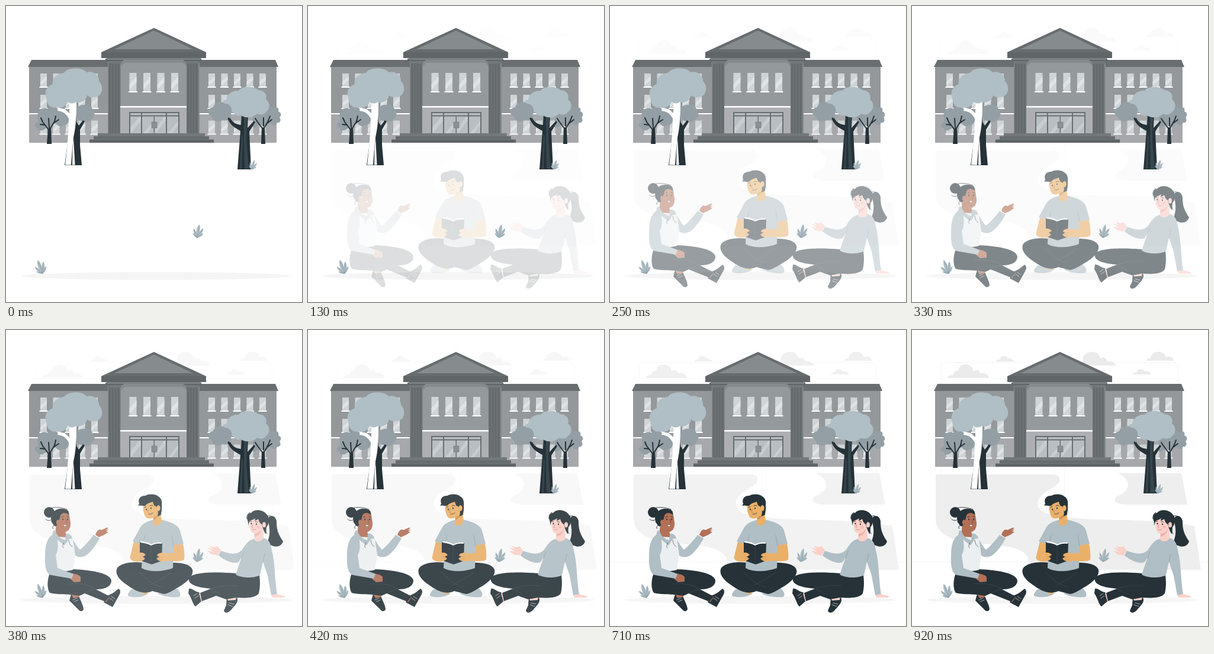
Animation of 500x500 px, one loop 1 s. Source, as an HTML page:

```html
<!DOCTYPE html>
<html lang="en">
<head>
<meta charset="utf-8">
<title>Campus lawn</title>
<style>
html, body { margin: 0; width: 100%; height: 100%; overflow: hidden; background: #fff; }
svg { display: block; width: 100vw; height: 100vh; }
.line { fill: none; stroke: #263238; stroke-linecap: round; stroke-linejoin: round; }
.dark { fill: #263238; }
.pale { fill: #b0bec5; }
.tan { fill: #eab069; }
.brown { fill: #b27057; }
.pink { fill: #fbd0c8; }
</style>
</head>
<body>
<svg viewBox="0 0 500 500" xmlns="http://www.w3.org/2000/svg">
<defs>
  <g id="plant">
    <path fill="#b0bec5" d="M0 0C-6-5-8-11-7-15C-3-12 0-6 0 0C-4-9-2-19 2-23C5-17 4-7 0 0C2-9 5-15 9-17C10-11 6-4 0 0C4-6 7-8 10-8C9-4 5-1 0 0C-4-1-7-4-8-7C-4-7-1-3 0 0Z"/>
    <path fill="none" stroke="#78909c" stroke-width=".5" d="M0 0Q-4-7-6-13M0 0Q1-10 2-20M0 0Q4-9 8-15M0 0L8-7M0 0L-7-6"/>
  </g>
</defs>

<g id="backdrop" opacity="0">
  <g fill="none" stroke="#f0f0f0" stroke-width=".8">
    <rect x="49" y="55" width="192" height="282" rx="6"/>
    <rect x="257.500" y="55" width="192" height="282" rx="6"/>
    <path d="M0 391.500H500"/>
  </g>
  <g fill="#ebebeb">
    <path d="M60 81C61 76 67 76 70 76C71 68 76 69 78 69C79 60 88 56 95 59C101 61 104 66 104 70C109 66 114 68 115 73C121 71 129 74 130 81Z"/>
    <path d="M142 53C143 50 147 50 149 49C150 43 159 42 162 48C166 46 168 48 168 50C171 50 172 51 172 53Z"/>
    <path d="M281 60C282 54 286 54 289 53C287 43 295 37 303 37C311 36 317 41 318 48C323 45 329 48 330 53C337 52 344 55 344 60Z"/>
    <path d="M396 52C397 47 400 48 403 48C403 41 410 36 418 37C425 38 428 42 429 46C435 43 442 46 442 52Z"/>
    <path d="M373 75C374 72 378 72 380 71C381 65 390 64 393 70C398 69 403 71 404 75Z"/>
  </g>
  <g fill="#eee">
    <path d="M40 244H238C247 244 251 249 249 255C245 266 224 271 216 283C206 299 218 308 238 313C292 325 400 316 477 331L488 405H200C193 396 201 393 195 383C181 360 126 364 91 358C59 353 40 339 40 320Z"/>
    <path d="M348 242H455L465 295H360C343 294 337 286 348 280C366 273 375 255 348 242Z"/>
  </g>
</g>

<ellipse cx="254" cy="456" rx="230" ry="6.500" fill="#f5f5f5"/>

<g id="building">
  <path fill="#94989b" d="M39 102H457V231H39Z"/>
  <path fill="#a6a8ab" d="M39 183H457V231H39Z"/>
  <path fill="#fff" d="M39 181H175V183H39ZM323 181H457V183H323Z"/>
  <path fill="#696e71" d="M43 91H455L460 103H37Z"/>
  <path fill="#858a8d" d="M172 88H327V220H172Z"/>
  <path fill="#94999c" d="M194 102L200 96H299L305 102V216H194Z"/>
  <path fill="#adafb2" d="M192 171H306V216H192Z"/>
  <path fill="#fff" d="M190 169H308V171.500H190Z"/>
  <g id="panes"></g>
  <g id="door">
    <path fill="#686e71" d="M208 179H293V216H208Z"/>
    <path fill="#b8bec1" d="M210 181H228V184.500H210ZM230 181H270V184.500H230ZM272 181H291V184.500H272ZM210 186.500H228V215H210ZM230 186.500H249.500V215H230ZM251 186.500H270V215H251ZM272 186.500H291V215H272Z"/>
    <path fill="#c8cdcf" d="M210 205L225 187H228V194L211 215H210ZM232 215L249 194V202L239 215ZM253 207L267 187H270V193L253 215ZM274 215L291 194V201L280 215Z"/>
    <path fill="#8a9194" stroke="#686e71" stroke-width=".6" d="M246 196H255V206H246Z"/>
  </g>
  <g id="columns"></g>
  <path fill="#606568" d="M161 78H338V88H161Z"/>
  <path fill="#7b8083" d="M170 88H329V91H170Z"/>
  <path fill="#676c6f" d="M161 78L250 37L338 78Z"/>
  <path fill="#868b8e" d="M183 73L250 41.500L316 73Z"/>
  <path fill="#73787b" d="M155 215H336V220H155Z"/>
  <path fill="#676c6f" d="M148 220H343V225.500H148Z"/>
  <path fill="#5f6467" d="M141 225.500H351V231H141Z"/>
</g>

<g id="trees">
  <g fill="#949fa5">
    <path d="M54 188C51 176 62 169 71 174C78 167 86 171 89 175C98 171 108 178 106 187C108 195 103 203 96 201C91 206 86 201 84 198L65 208C60 213 53 210 54 206C47 206 47 197 54 196Z"/>
    <path d="M119 183C116 174 122 166 132 167C141 165 146 171 146 175C152 179 149 188 145 190C143 197 132 196 127 194C121 194 118 188 119 183Z"/>
    <path d="M417 182C420 174 432 172 441 175C447 170 451 168 452 173C458 169 462 173 460 178C466 180 465 186 462 188C466 194 462 198 458 197C455 204 449 201 446 197C440 205 432 204 428 199C421 210 412 205 417 198Z"/>
  </g>
  <g class="line" stroke-width="2">
    <path d="M72 209L62 196L59 189M66 201L58 200M74 208L82 195L84 186M80 198L89 192M73 206L72 190"/>
    <path d="M434 208L425 196L421 190M435 208L443 194L446 186M441 198L449 192M435 203V189"/>
  </g>
  <path class="dark" d="M71 207H76L77 233H69ZM432 205H437L438 233H431Z"/>

  <path class="dark" d="M117 160L119 196L123 202L130 193L133 195L125 209L125 235L128 269H99L105 225L107 187L117 182Z"/>
  <path fill="#fff" d="M107 160H119C119 190 118 204 114 222L112 240L110 268.500H100C105 225 106 205 106 190C101 181 96 178 87 177L88 172L99 174L107 181Z"/>
  <path fill="#fff" d="M114 222L116.500 268.500H112L112.500 238Z"/>
  <path class="pale" d="M68 154C64 144 70 135 79 132C77 122 88 113 98 113C103 104 128 102 136 112C147 109 158 117 157 127C165 134 164 151 153 153C146 156 139 153 137 151C135 160 126 165 118 162C113 166 106 165 104 161C102 170 93 174 86 171C75 174 68 166 68 154Z"/>

  <path class="dark" d="M398 182H409L408 206L419 194L421 196L411 212L414 276H391L396 211C388 206 379 203 375 190L379 189C382 198 391 200 397 201Z"/>
  <path fill="#37474f" d="M402 186L407 187L406 228L410 275H403L402 228ZM398 215L400 222L398 275H395Z"/>
  <path class="pale" d="M363 177C361 168 364 160 372 158C374 147 384 142 393 143C398 135 418 134 426 142C437 142 442 151 439 158C447 163 446 175 439 179C436 185 427 184 424 182C418 189 404 190 397 185C390 187 385 182 383 179C377 184 366 184 363 177Z"/>
  <path fill="#949fa5" d="M343 183C339 177 345 171 350 171C352 162 364 160 370 165C380 165 384 176 380 182C382 190 374 195 367 192C359 198 348 194 349 188Z"/>
  <path class="line" stroke-width="3" d="M376 190Q380 201 397 204"/>
  <use href="#plant" transform="translate(415 276) scale(.72) rotate(12)"/>
</g>

<use href="#plant" transform="translate(322.500 391.500) rotate(6)"/>
<use href="#plant" transform="translate(62 452) scale(1.070) rotate(-25)"/>

<g id="people" opacity="0">
  <g id="reader">
    <path class="pale" d="M224 438L212 438C208 442 203 448 208 450C221 453 235 450 241 445ZM276 438L289 437C294 441 297 449 292 451C279 452 264 450 256 445Z"/>
    <path class="tan" d="M228 438L240 441L236 447L229 444Z"/>
    <path class="dark" d="M233 393C210 390 190 395 187 404C183 418 203 430 214 437C226 444 237 446 247 441L267 446C274 445 280 441 287 437C300 430 318 417 315 405C312 395 292 391 266 394Z"/>
    <path class="line" style="stroke:#43535b" stroke-width=".5" d="M225 409C237 419 245 431 263 434M279 410Q260 423 244 431"/>
    <path class="tan" d="M216 357L232 362L228 376L238 379C239 386 235 391 226 391C214 392 208 388 210 382ZM282 363L299 361C301 371 302 380 301 388C296 392 270 391 261 390L266 377L281 378Z"/>
    <path class="pale" d="M247 321C237 324 231 327 227 333L214 357L231 363L229 402C242 410 267 408 282 402L283 364L300 361L294 339C291 329 280 325 265 321Z"/>
    <path class="tan" d="M264 377L284 377V390L262 390Z"/>
    <path class="line" style="stroke:#8195a0" stroke-width=".6" d="M231 362L235 347M283 364L280 347"/>
    <path class="tan" d="M249 308L260 303L263 322C261 332 249 333 248 326Z"/>
    <path fill="#cf954f" d="M249 316Q255 314 259 308Q258 317 249 321Z"/>
    <path class="dark" d="M226 358C234 358 240 360 245 363C251 360 257 359 264 360L263 390L246 396L226 389Z"/>
    <path fill="#fff" d="M227 357C235 357 241 359 245 362C251 359 257 358 263 359V361C256 360 251 361 245 364C239 361 234 360 227 359Z"/>
    <path class="line" style="stroke:#43535b" stroke-width=".5" d="M245 365V395"/>
    <path class="tan" d="M222 378C228 374 234 377 236 380L231 383L235 386C232 390 226 392 220 390ZM269 377C262 375 255 378 255 381L259 383L254 386C257 390 264 393 270 390Z"/>
    <path class="line" style="stroke:#c78c48" stroke-width=".6" d="M228 382H233M227 386H233M257 383H264M257 387H264"/>
    <path class="tan" d="M233 291C230 299 232 312 237 317C244 321 252 316 255 310L260 299L257 286Z"/>
    <path class="dark" d="M234 297C228 297 226 296 223 297C224 295 225 294 225 293C222 285 228 279 235 280C241 276 254 277 257 281C263 284 264 291 263 297C264 303 262 308 262 312L256 315C258 307 256 303 254 298C250 298 249 294 248 290C242 292 238 293 235 297Z"/>
    <ellipse class="tan" cx="257.500" cy="301" rx="3.200" ry="5"/>
    <path class="dark" d="M236 303a1 1.600 0 1 0 2 0a1 1.600 0 1 0-2 0M244 301a1 1.600 0 1 0 2 0a1 1.600 0 1 0-2 0"/>
    <path class="line" stroke-width=".9" d="M234 299.500L237 298.500M243 297Q246 295 248 297"/>
    <path class="line" style="stroke:#a86b35" stroke-width=".7" d="M240 303L239 307L241 308"/>
    <path class="line" stroke-width=".8" d="M241 311Q245 312 248 309"/>
  </g>

  <g id="talker">
    <path class="dark" d="M110 446L123 449C125 456 131 465 131 472C129 476 125 476 122 472L107 457ZM165 460L173 448C180 446 186 440 190 437C194 439 194 444 190 450L180 468Z"/>
    <path class="brown" d="M110 446L123 447L124 451L114 453ZM165 455L172 447L175 451L169 460Z"/>
    <path class="dark" d="M77 405C70 416 68 435 74 444C85 447 98 446 109 447L124 449L133 445L168 459L175 450L152 438C170 438 178 432 178 423C176 411 146 405 108 404Z"/>
    <path class="line" style="stroke:#43535b" stroke-width=".5" d="M105 429Q134 426 151 437L131 445"/>
    <path class="line" style="stroke:#fff" stroke-width=".6" d="M113 456L120 453M115 459L122 456M175 453L181 457M178 450L184 454"/>
    <path class="pale" d="M110 350C116 357 120 367 125 371C133 365 142 354 148 346L158 352C152 363 144 375 135 381C126 386 118 383 114 378Z"/>
    <path class="brown" d="M151 346C153 340 157 335 161 338L170 334C175 333 171 337 168 338L174 337L169 340L173 341L166 346L157 350ZM109 411C118 412 124 414 126 417V425L115 426L107 419Z"/>
    <path fill="#eceff1" d="M81 346C95 344 108 347 113 352L117 380L113 405C102 409 87 407 79 402Z"/>
    <path class="pale" d="M82 344C70 349 66 362 66 380C65 400 68 412 76 414L111 420L114 412L87 402L84 380C90 372 88 350 82 344Z"/>
    <path class="brown" d="M85 325L100 339L102 350L83 349Z"/>
    <path class="pale" d="M81 338C76 345 79 350 84 352L99 364L106 353L112 352C111 346 105 343 101 344L100 355C91 353 85 345 84 340Z"/>
    <path class="line" stroke-width=".6" d="M98 359Q94 365 97 368M106 355Q107 364 112 366"/>
    <circle class="dark" cx="73" cy="308" r="9"/>
    <path class="brown" d="M88 309C96 302 106 306 107 313L109 325C110 336 104 342 97 341C90 341 84 334 84 326Z"/>
    <path class="dark" d="M76 318C76 304 92 298 103 304Q107 307 106 312C99 307 95 309 92 313L90 321L86 330C82 335 80 327 77 325Z"/>
    <path class="line" stroke-width=".9" d="M75 301C83 298 95 300 103 303M67 320C75 325 78 319 82 315M82 328Q76 336 80 335M103 304Q106 306 106 311"/>
    <ellipse class="brown" cx="88" cy="325" rx="3" ry="4.500"/>
    <path class="dark" d="M95 320a1 1.600 0 1 0 2 0a1 1.600 0 1 0-2 0M103 320a1 1.600 0 1 0 2 0a1 1.600 0 1 0-2 0"/>
    <path class="line" stroke-width=".9" d="M94 316L97 315M103 315L106 316"/>
    <path class="line" style="stroke:#7d4233" stroke-width=".7" d="M101 320L103 325L101 326"/>
    <path fill="#fff" stroke="#5d3028" stroke-width=".5" d="M96 328Q100 330 103 329Q101 333 99 332Z"/>
  </g>

  <g id="listener">
    <path class="dark" d="M309 437C313 435 319 442 326 443L334 455L320 467C316 465 314 453 308 445ZM373 450L390 452C394 459 386 466 379 474C374 479 369 478 368 474L372 465Z"/>
    <path class="pink" d="M326 445L334 442L336 454L330 459ZM372 450L389 450L388 456L375 457Z"/>
    <path class="dark" d="M388 411C351 408 315 409 309 419C306 430 324 435 346 437L328 444L331 458L355 449L372 455L388 452C405 453 421 453 427 445C430 432 429 422 428 414Z"/>
    <path class="line" style="stroke:#43535b" stroke-width=".5" d="M346 437C360 432 374 431 390 432M346 437L363 446"/>
    <path class="line" style="stroke:#fff" stroke-width=".6" d="M317 449L323 445M319 453L325 449M377 461L385 463M375 464L383 467"/>
    <path class="dark" d="M443 324C440 312 455 310 457 323C457 338 460 345 468 357C466 365 457 368 449 364C443 362 442 358 443 354C446 345 446 336 443 324Z"/>
    <path class="pink" d="M363 372L358 381L347 379L340 373L349 374L339 367L349 370L344 365L353 367L357 365ZM448 446L458 446L472 450L470 452L450 452Z"/>
    <path class="pale" d="M419 353C411 354 406 360 399 371C390 381 377 378 363 373L359 381C371 390 384 396 393 392L398 384L388 413C398 420 421 419 429 414L434 391L442 415L448 448L458 446C454 426 455 395 449 372C447 360 444 352 432 351Z"/>
    <path class="line" style="stroke:#8195a0" stroke-width=".6" d="M398 385L402 374M434 392L437 378"/>
    <path class="pink" d="M419 336L434 328L435 352C431 359 420 358 419 353Z"/>
    <path fill="#edb3aa" d="M420 344Q428 343 432 336Q430 347 420 349Z"/>
    <path class="pink" d="M412 314C410 325 411 337 415 342C423 346 430 341 433 334L440 324L433 310Z"/>
    <path class="dark" d="M409 331C410 326 408 322 407 318C408 310 411 309 414 309C419 302 434 303 440 311C446 316 445 328 440 333L439 345C435 340 434 334 432 328C428 326 427 322 426 319C424 321 422 322 420 322L421 318C417 321 413 321 411 324Z"/>
    <path class="line" stroke-width="1" d="M412 308Q406 311 407 319M440 315Q447 312 451 316M438 333Q438 341 441 344"/>
    <ellipse class="pink" cx="436" cy="329" rx="3" ry="4.500"/>
    <path class="dark" d="M413.500 327a1 1.600 0 1 0 2 0a1 1.600 0 1 0-2 0M422 328a1 1.600 0 1 0 2 0a1 1.600 0 1 0-2 0"/>
    <path class="line" stroke-width=".8" d="M412.500 323.500L415 323M421 323.500L425 324.500"/>
    <path class="line" style="stroke:#c87870" stroke-width=".7" d="M417 329L415 333L417 334M416 337Q419 339 422 337"/>
    <circle cx="426" cy="333" r="2.500" fill="#f3aaa3" opacity=".5"/>
  </g>
</g>
</svg>
<script>
const byId = id => document.getElementById(id);
const box = (x, y, w, h, fill) =>
  `<rect x="${x}" y="${y}" width="${w}" height="${h}" fill="${fill}"/>`;

function pane(x, y, w, h) {
  const glare = `M${x} ${y + h * .62}L${x + w} ${y + h * .2}V${y + h * .5}L${x} ${y + h * .92}Z`;
  return box(x, y, w, h, "#cfd4d6") + `<path d="${glare}" fill="#e0e3e5"/>` +
    box(x - 1.5, y + h, w + 3, 2, "#fff");
}

function column(x) {
  let parts = box(x - 5, 89, 30, 4, "#5f6467") + box(x - 2, 93, 24, 4, "#74797c") +
    box(x, 97, 20, 119, "#6c7174");
  for (let i = 0; i < 4; i++) parts += box(x + 2 + i * 4.7, 97, 1.3, 119, "#616669");
  return parts;
}

let panes = "";
for (const left of [58, 342])
  for (const y of [114, 150, 193.5])
    for (let i = 0; i < 5; i++) panes += pane(left + i * 21.5, y, 11, 22);
for (let i = 0; i < 4; i++) panes += pane(208.5 + i * 23.5, 113, 12, 31);
byId("panes").innerHTML = panes;
byId("columns").innerHTML = column(173) + column(305);

const LOOP = 1000, FPS = 24;
const people = byId("people"), backdrop = byId("backdrop");
const progress = (x, from, to) => Math.min(1, Math.max(0, (x - from) / (to - from)));

function draw(ms) {
  const step = Math.floor((ms % LOOP) * FPS / 1000 + .05);
  people.setAttribute("opacity", progress(step, 1.5, 11));
  backdrop.setAttribute("opacity", progress(step, 1, 22) ** 1.2);
}

let start;
function tick(now) {
  start ??= now;
  draw(now - start);
  requestAnimationFrame(tick);
}
requestAnimationFrame(tick);
</script>
</body>
</html>
```
